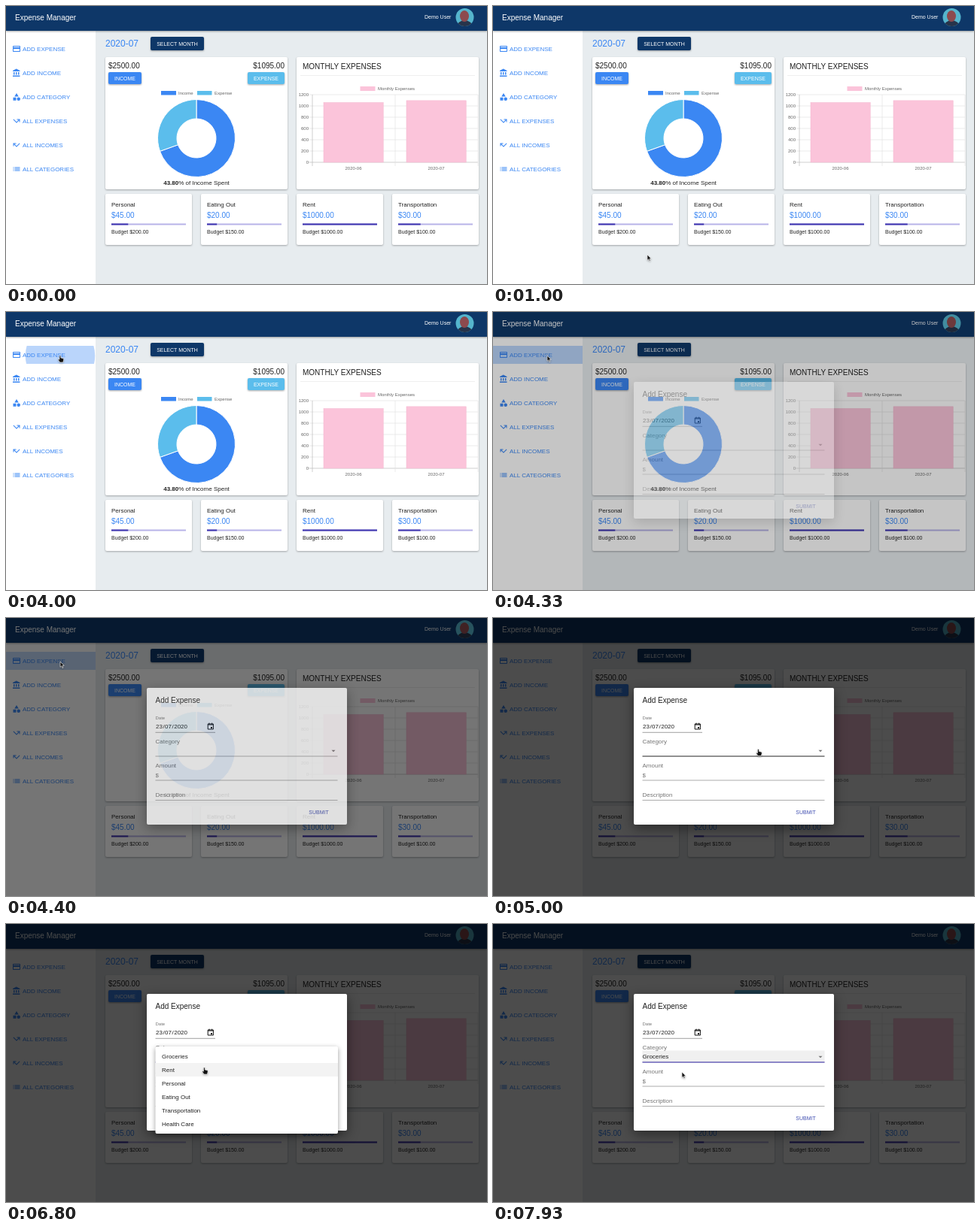
An HTML page that plays this animation: 639 by 370 pixels, repeating every 8 s.

```html
<!DOCTYPE html>
<html lang="en">
<head>
<meta charset="utf-8">
<title>Expense Manager</title>
<style>
html, body { margin: 0; width: 100%; height: 100%; overflow: hidden; background: #e7ecef; }
svg { display: block; width: 100vw; height: 100vh; font-family: "Liberation Sans", Arial, sans-serif; }
.card { fill: #fff; filter: drop-shadow(0 1px 1px rgba(0,0,0,.3)); }
.button { filter: drop-shadow(0 1px 1px rgba(0,0,0,.35)); }
.paper { fill: #fff; filter: drop-shadow(0 5px 8px rgba(0,0,0,.45)); }
.menu { fill: #fff; filter: drop-shadow(0 2px 3px rgba(0,0,0,.4)); }
#cursor { filter: drop-shadow(0 1px 1px rgba(0,0,0,.3)); }
</style>
</head>
<body>
<svg id="stage" viewBox="0 0 639 370"></svg>
<script>
const NAVY = '#0e3768', BLUE = '#3b87f3', SKY = '#5bbdec', PINK = '#fbc4da', INK = '#212121', GREY = '#757575';

const rect = (x, y, w, h, fill, more = '') =>
  `<rect x="${x}" y="${y}" width="${w}" height="${h}" fill="${fill}" ${more}/>`;
// Text is placed by the vertical centre of its capitals.
const text = (x, mid, size, fill, str, anchor = 'start') =>
  `<text x="${x}" y="${mid + size * .36}" font-size="${size}" fill="${fill}" text-anchor="${anchor}">${str}</text>`;
const line = (x1, y1, x2, y2, color) =>
  `<path d="M${x1} ${y1}L${x2} ${y2}" stroke="${color}" stroke-width=".7"/>`;
const card = (x, y, w, h) => rect(x, y, w, h, '#fff', 'rx="2" class="card"');
const button = (x, y, w, h, fill, label) =>
  rect(x, y, w, h, fill, 'rx="2" class="button"') + text(x + w / 2, y + h / 2, 7, '#fff', label, 'middle');

function slice(from, to, fill) {
  const at = (turn, r) => {
    const a = (turn - .25) * 2 * Math.PI;
    return `${253 + r * Math.cos(a)} ${176 + r * Math.sin(a)}`;
  };
  const big = to - from > .5 ? 1 : 0;
  return `<path d="M${at(from, 51.5)}A51.5 51.5 0 ${big} 1 ${at(to, 51.5)}L${at(to, 26)}` +
    `A26 26 0 ${big} 0 ${at(from, 26)}Z" fill="${fill}" stroke="#fff"/>`;
}

const nav = [
  ['ADD EXPENSE', 'M20 4H4c-1.1 0-2 .9-2 2v12c0 1.1.9 2 2 2h16c1.1 0 2-.9 2-2V6c0-1.1-.9-2-2-2zm0 14H4v-6h16v6zm0-10H4V6h16v2z'],
  ['ADD INCOME', 'M4 10v7h3v-7H4zm6 0v7h3v-7h-3zM2 22h19v-3H2v3zm14-12v7h3v-7h-3zM11.5 1L2 6v2h19V6z'],
  ['ADD CATEGORY', 'M12 2l-5.5 9h11zM3 13.5h8v8H3zM13 17.5a4.5 4.5 0 1 0 9 0a4.5 4.5 0 1 0-9 0z'],
  ['ALL EXPENSES', 'M3 8.4l9 9 7-7V15h2V7h-8v2h4.6L12 14.6 4.4 7z'],
  ['ALL INCOMES', 'M19.6 7L12 14.6 6.4 9H11V7H3v8h2v-4.6l7 7 9-9z'],
  ['ALL CATEGORIES', 'M3 11h2v2H3zM3 15h2v2H3zM3 7h2v2H3zM7 11h14v2H7zM7 15h14v2H7zM7 7h14v2H7z']
].map(([label, d], i) => {
  const y = 57 + 32 * i;
  return `<path transform="translate(8 ${y - 6}) scale(.5)" d="${d}" fill="${BLUE}"/>` + text(22, y, 8, BLUE, label);
}).join('');

const header = rect(0, 0, 639, 33, NAVY, 'class="button"') +
  text(12, 15, 10, '#fff', 'Expense Manager') + text(556, 14.5, 7, '#fff', 'Demo User') +
  `<clipPath id="round"><circle cx="609.5" cy="15" r="12"/></clipPath>
  <g clip-path="url(#round)">${rect(597, 3, 25, 24, '#55b5cd')}
    <path d="M598 28Q600 20 609 19Q619 20 621 28Z" fill="#27344b"/>
    <ellipse cx="609" cy="13.5" rx="6" ry="7.5" fill="#8d4a4e"/></g>`;

const donutCard = card(132, 68, 242, 176) +
  text(136, 79.5, 10, INK, '$2500.00') + text(370, 79.5, 10, INK, '$1095.00', 'end') +
  button(136, 88, 44, 16, BLUE, 'INCOME') + button(321, 88, 49, 16, SKY, 'EXPENSE') +
  rect(206, 113, 20, 5.5, BLUE) + text(229, 116, 6, '#666', 'Income') +
  rect(254, 113, 19.5, 5.5, SKY) + text(277, 116, 6, '#666', 'Expense') +
  slice(0, 2500 / 3595, BLUE) + slice(2500 / 3595, 1, SKY) +
  text(253, 235, 8, INK, '<tspan font-weight="bold">43.80</tspan>% of Income Spent', 'middle');

const level = v => 208 - v * 90 / 1200;
const barCard = card(386, 68, 242, 176) + text(394, 80, 10, INK, 'MONTHLY EXPENSES') +
  line(391, 92.5, 623, 92.5, '#e8e8e8') +
  rect(470.5, 107, 20, 6, PINK) + text(494, 110, 6, '#666', 'Monthly Expenses') +
  [0, 200, 400, 600, 800, 1000, 1200].map(v =>
    line(402, level(v), 627, level(v), v ? '#e3e3e3' : '#bbb') + text(402, level(v), 6, '#666', v, 'end')).join('') +
  [407, 517, 627].map((x, i) => line(x, 118, x, 213, i ? '#e3e3e3' : '#bbb')).join('') +
  [['2020-06', 1060], ['2020-07', 1095]].map(([month, v], i) =>
    rect(422 + 110 * i, level(v), 79.2, 208 - level(v), PINK, 'stroke="#f3b3cd" stroke-width=".5"') +
    text(461.5 + 110 * i, 216, 6, '#666', month, 'middle')).join('');

const budgets = [['Personal', 45, 200], ['Eating Out', 20, 150], ['Rent', 1000, 1000], ['Transportation', 30, 100]]
  .map(([name, spent, budget], i) => {
    const x = 132 + 127 * i;
    return card(x, 250, 115, 68) + text(x + 8, 264, 8, INK, name) + text(x + 8, 278, 10, BLUE, `$${spent}.00`) +
      rect(x + 8, 289.5, 99, 2, '#b8b3e8') + rect(x + 8, 289.5, 99 * spent / budget, 2, '#3f35b0') +
      text(x + 8, 300.5, 7, INK, `Budget $${budget}.00`);
  }).join('');

const dialog = rect(187, 93, 266, 182, '#fff', 'rx="2" class="paper"') +
  text(198.5, 109, 10, INK, 'Add Expense') + text(198.5, 132.5, 6, GREY, 'Date') +
  [[199, '23'], [208.4, '/'], [211.1, '07'], [220.5, '/'], [223.2, '2020']]
    .map(([x, part]) => text(x, 144.5, 8, INK, part)).join('') +
  `<path d="M268.2 141h7.2v7h-7.2zM268.2 142h7.2M270 139.6v2M273.6 139.6v2" fill="none" stroke="#111"/>` +
  rect(272, 145, 2, 2, '#111') +
  line(198.5, 152.3, 278, 152.3, '#777') +
  rect(198.5, 168.5, 242, 15.5, '#f0f0f0', 'id="field" opacity="0"') +
  text(198.5, 164.5, 8, GREY, 'Category') +
  `<text id="choice" x="198.5" y="179.4" font-size="8" fill="${INK}"></text>` +
  `<path d="M432.5 175.8h5l-2.5 2.5z" fill="${GREY}"/>` +
  '<path id="rule" d="M198.5 184H440.5"/>' +
  '<path id="focus" stroke="#4a3fc0" stroke-width="1.2"/>' +
  text(198.5, 196.5, 8, GREY, 'Amount') + text(198.5, 209, 8, GREY, '$') + line(198.5, 216, 440.5, 216, '#888') +
  text(198.5, 235, 8, GREY, 'Description') + line(198.5, 242.5, 440.5, 242.5, '#888') +
  text(415.5, 258, 7, '#3f4db0', 'SUBMIT', 'middle');

const menu = rect(198.5, 163, 242.5, 116, '#fff', 'rx="2" class="menu"') +
  rect(198.5, 167, 242.5, 18, '#f3f3f3', 'id="hover"') +
  ['Groceries', 'Rent', 'Personal', 'Eating Out', 'Transportation', 'Health Care']
    .map((name, i) => text(207, 176.5 + 18 * i, 8, INK, name)).join('');

document.getElementById('stage').innerHTML =
  rect(0, 0, 639, 370, '#e7ecef') + rect(0, 33, 119, 337, '#fff') +
  `<clipPath id="row">${rect(0, 45, 119, 24, '#fff')}</clipPath>
  <circle id="ripple" cx="72" cy="58" fill="${BLUE}" clip-path="url(#row)"/>` +
  nav + text(132, 50, 12, BLUE, '2020-07') + button(192, 41, 71, 18, NAVY, 'SELECT MONTH') +
  donutCard + barCard + budgets + header +
  rect(0, 0, 639, 370, '#000', 'id="shade"') +
  `<g id="dialog">${dialog}</g><g id="menu">${menu}</g>
  <g id="cursor" fill="#111" stroke="#fff" stroke-width=".6" stroke-linejoin="round">
    <path id="arrow" d="M0 0V7.4L1.7 5.9L2.9 8.6L4.1 8.1L2.9 5.4H5.2Z"/>
    <path id="hand" d="M-1 .6Q0-.6 .8 .6V3L4 3.8Q5 4.2 4.6 6L3.8 9H-.4L-2.8 5.6Q-2.6 4.2-1 5.2Z"/>
  </g>`;

const el = id => document.getElementById(id);
const set = (id, attrs) => { for (const k in attrs) el(id).setAttribute(k, attrs[k]); };
const ease = (t, start, length) => {
  const p = Math.min(1, Math.max(0, (t - start) / length));
  return p * p * (3 - 2 * p);
};

// Time, x, y of the pointer tip.
const path = [
  [500, 150, 374], [870, 190, 347], [1000, 205, 331], [1330, 205, 331], [2130, 91, 204],
  [2500, 82, 61.5], [2700, 82, 61.5], [3130, 72, 58], [4450, 72, 58], [5000, 352.5, 174.5],
  [6250, 352.5, 174.5], [6750, 263.5, 191], [6850, 263.5, 191], [7150, 249, 177],
  [7500, 249, 177], [7930, 251, 197]
];
function pointer(t) {
  const i = path.findIndex(k => k[0] > t);
  if (i === 0) return [0, 400];
  if (i < 0) return path[path.length - 1].slice(1);
  const a = path[i - 1], b = path[i], p = ease(t, a[0], b[0] - a[0]);
  return [a[1] + (b[1] - a[1]) * p, a[2] + (b[2] - a[2]) * p];
}

function draw(t) {
  const [x, y] = pointer(t);
  const open = ease(t, 4245, 225);
  const list = ease(t, 6170, 240) * (1 - ease(t, 7230, 220));
  const grow = .75 + .25 * ease(t, 6170, 240);
  const focus = 121 * ease(t, 5800, 200);
  const overField = t > 4500 && x > 198 && x < 441 && y > 167 && y < 185;
  const hand = t < 4300 ? x < 92 && y < 222 : overField || (t > 6200 && t < 7300);

  set('ripple', { r: 110 * ease(t, 3800, 450), opacity: .35 * (1 - ease(t, 4330, 300)) });
  set('shade', { opacity: .7 * open });
  set('dialog', { opacity: open });
  set('rule', { stroke: overField ? '#222' : '#888', 'stroke-width': overField ? 1 : .7 });
  set('focus', { d: `M${319.5 - focus} 184H${319.5 + focus}`, opacity: focus ? 1 : 0 });
  set('field', { opacity: focus / 121 });
  el('choice').textContent = t >= 7230 ? 'Groceries' : '';
  set('menu', { opacity: list, transform: `translate(319.5 171) scale(${grow} ${grow * grow}) translate(-319.5 -171)` });
  set('hover', { y: 167 + 18 * Math.max(0, Math.floor((y - 167) / 18)) });
  set('cursor', { transform: `translate(${x} ${y})` });
  set('arrow', { opacity: hand ? 0 : 1 });
  set('hand', { opacity: hand ? 1 : 0 });
}

const begin = performance.now();
function tick() {
  draw((performance.now() - begin) % 8000);
  requestAnimationFrame(tick);
}
tick();
</script>
</body>
</html>
```
